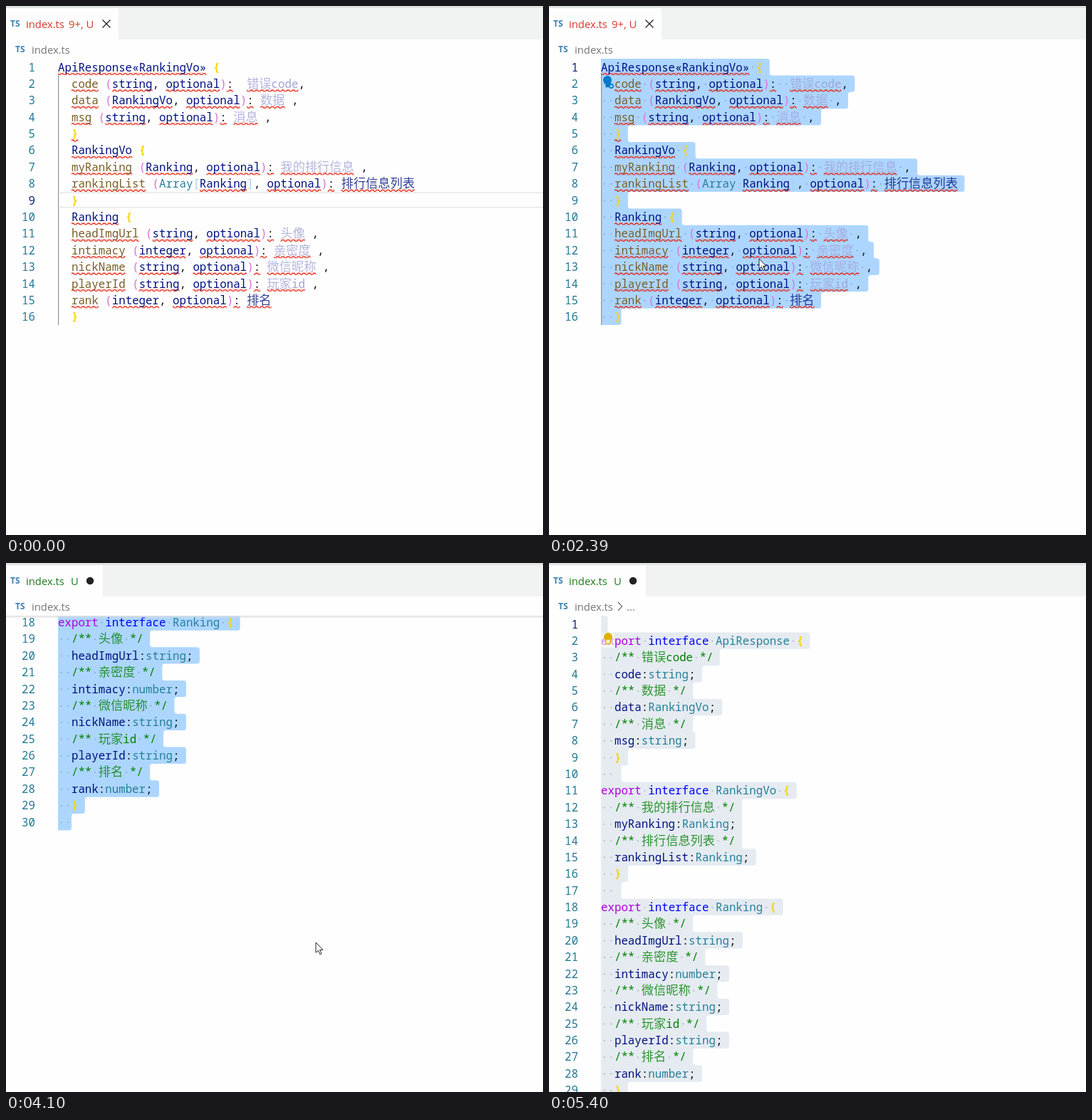
These frames come from a looping animation (754x743 px, 5490 ms). An HTML page:

```html
<!DOCTYPE html>
<html lang="zh">
<head>
<meta charset="utf-8">
<title>index.ts</title>
<style>
  html, body { margin: 0; width: 100%; height: 100%; overflow: hidden; background: #fefefe; }
  svg { display: block; width: 754px; height: 743px; }
  text { white-space: pre; }
  .code text { font: 15.78px "Noto Sans Mono", "DejaVu Sans Mono", monospace; }
  .code text.han { font: 300 17.2px "Noto Sans CJK SC", "Noto Sans CJK", sans-serif; fill-opacity: .8; }
  .code text.num { text-anchor: end; fill: #237893; }
  .code text.num.on { fill: #0b216f; }
  .ui { font: 14.8px "Open Sans", "Noto Sans", sans-serif; }
  .ts { font: bold 12px "Open Sans", "Noto Sans", sans-serif; fill: #3c7fb1; }
  .fn { fill: #795e26; } .var { fill: #001080; } .type { fill: #267f99; }
  .key { fill: #af00db; } .kw { fill: #0000ff; } .note { fill: #008000; }
  .code text.gold { fill: #fbd404; font-weight: 600; }
  .pink { fill: #da70d6; } .sky { fill: #9fd3f5; }
  .dim { fill: #a0a3d4; } .op { fill: #111; }
  .dots { fill: #333; fill-opacity: .25; }
</style>
</head>
<body>
<svg id="stage" viewBox="0 0 754 743">
  <defs>
    <pattern id="wave" patternUnits="userSpaceOnUse" x="73" y="19.6" width="7.38" height="3.69">
      <path transform="scale(1.23)" fill="#e51400"
        d="M5.5 0 2.5 3H1.1L4.1 0ZM4 0 6 2V.6L5.4 0ZM0 2 1 3H2.4L0 .6Z"/>
    </pattern>
    <linearGradient id="shade" x2="0" y2="1">
      <stop stop-color="#ddd"/><stop offset="1" stop-color="#ddd" stop-opacity="0"/>
    </linearGradient>
    <clipPath id="pane"><path d="M0 74H754V743H0Z"/></clipPath>
  </defs>

  <rect width="754" height="743" fill="#fefefe"/>
  <rect width="754" height="3" fill="#e2e3e3"/>
  <rect id="bar" y="3" width="754" height="44" fill="#f1f3f3"/>
  <text class="ts" x="6" y="29">TS</text>
  <g id="tab" class="ui">
    <text x="28" y="31">index.ts</text>
    <text id="badge" x="88" y="31"></text>
  </g>
  <path id="cross" d="M135.5 19.5 146.5 30.5M146.5 19.5 135.5 30.5" stroke="#222" stroke-width="1.3"/>
  <circle id="dirty" cy="25" r="5.2" fill="#222"/>
  <text class="ts" x="13" y="65">TS</text>
  <text class="ui" x="36" y="66.5" fill="#767676">index.ts</text>
  <g id="crumb">
    <path d="M97 55 102.5 61 97 67" fill="none" stroke="#767676" stroke-width="1.3"/>
    <text class="ui" x="109" y="66.5" fill="#767676">...</text>
  </g>

  <g clip-path="url(#pane)">
    <g id="raw" class="code"></g>
    <g id="made" class="code"></g>
    <rect id="shadow" y="74" width="754" height="4" fill="url(#shade)"/>
  </g>
  <path id="fold" d="M53.5 199.5 59.5 205.5 65.5 199.5" fill="none" stroke="#c3c7ca" stroke-width="1.3"/>

  <g id="pointer">
    <path id="beam" d="M-4-7.5H-1L0-6.5 1-7.5H4M0-6.5V6.5M-4 7.5H-1L0 6.5 1 7.5H4" fill="none" stroke="#222" stroke-width="1.2"/>
    <path id="arrow" d="M0 0V14.2L3.4 11.2 5.8 16.6 8 15.6 5.7 10.3H10Z" fill="#fff" stroke="#222" stroke-linejoin="round"/>
    <path id="hand" d="M-2-7.5C-2-9.5 1-9.5 1-7.5V-2.5C2-3.5 3.6-3 3.8-1.8 4.8-2.6 6-2 6.2-.8 7.4-1.2 8 0 7.6 1.5V5C7.6 7 6 8 6 10.5H-2C-2 8-6.5 4-6.5 1.5-5.6.2-4 .5-2 3Z"
      fill="#fff" stroke="#222" stroke-width="1.2" stroke-linejoin="round"/>
  </g>
</svg>

<script>
const LOOP = 5490, LEFT = 73, TOP = 74, ROW = 23.38, CELL = 9.47, HAN = 17.2;
const $ = id => document.getElementById(id);
const isHan = c => c >= '\u4e00' && c <= '\u9fff';
const span = s => [...s].reduce((w, c) => w + (isHan(c) ? HAN : CELL), 0);
const show = (el, on) => el.setAttribute('visibility', on ? 'inherit' : 'hidden');

function add(parent, tag, attrs, body) {
  const el = document.createElementNS('http://www.w3.org/2000/svg', tag);
  for (const key in attrs) el.setAttribute(key, attrs[key]);
  if (body) el.textContent = body;
  return parent.appendChild(el);
}

const rawRows = `ApiResponse«RankingVo» {
  code (string, optional):  错误code,
  data (RankingVo, optional): 数据 ,
  msg (string, optional): 消息 ,
  }
  RankingVo {
  myRanking (Ranking, optional): 我的排行信息 ,
  rankingList (Array[Ranking], optional): 排行信息列表
  }
  Ranking {
  headImgUrl (string, optional): 头像 ,
  intimacy (integer, optional): 亲密度 ,
  nickName (string, optional): 微信昵称 ,
  playerId (string, optional): 玩家id ,
  rank (integer, optional): 排名
  }`.split('\n');

const models = {
  ApiResponse: ['错误code|code:string', '数据|data:RankingVo', '消息|msg:string'],
  RankingVo: ['我的排行信息|myRanking:Ranking', '排行信息列表|rankingList:Ranking'],
  Ranking: ['头像|headImgUrl:string', '亲密度|intimacy:number', '微信昵称|nickName:string',
    '玩家id|playerId:string', '排名|rank:number']
};
const madeRows = [''];
for (const name in models) {
  madeRows.push(`export interface ${name} {`);
  for (const field of models[name]) {
    const [note, code] = field.split('|');
    madeRows.push(`  /** ${note} */`, `  ${code};`);
  }
  madeRows.push('  }', '  ');
}

const marks = { '{': 'gold', '}': 'gold', '(': 'pink', ')': 'pink', '[': 'sky', ']': 'sky' };

function rawClass(tok, rest) {
  if (isHan(tok[0])) return rest ? 'dim' : 'var';
  if (tok === 'Array') return 'type';
  if (/^\w/.test(tok)) return rest.startsWith(' (') ? 'fn' : 'var';
  return marks[tok] || (/[«»]/.test(tok) ? 'var' : 'op');
}

function madeClass(tok, rest) {
  if (tok.startsWith('/*')) return 'note';
  if (tok === 'export') return 'key';
  if (tok === 'interface') return 'kw';
  if (/^\w/.test(tok)) return rest[0] === ':' ? 'var' : 'type';
  return marks[tok] || 'op';
}

function buildDoc(id, rows, classOf, rawWaves) {
  const g = $(id);
  const sel = add(g, 'path', {});
  const guide = add(g, 'path', { fill: 'none', stroke: '#939393', 'stroke-width': 1.2 });
  const waves = add(g, 'g', {});
  const words = add(g, 'g', {});
  const clip = add(add(g, 'clipPath', { id: id + 'Clip' }), 'path', {});
  const dots = add(g, 'g', { class: 'dots', 'clip-path': `url(#${id}Clip)` });
  const nums = [];

  rows.forEach((row, i) => {
    const y = TOP + i * ROW, move = { transform: `translate(0 ${y})` };
    const line = add(words, 'g', move), wave = add(waves, 'g', move), dot = add(dots, 'g', move);
    const underline = (x, width) => add(wave, 'rect', { x, y: 19.6, width, height: 3.69, fill: 'url(#wave)' });
    nums.push(add(line, 'text', { class: 'num', x: 41, y: 17.6 }, String(i + 1)));

    for (const m of row.matchAll(/\/\*.*\*\/|[\u4e00-\u9fff]+\w*|\w+|\S/g)) {
      const tok = m[0], rest = row.slice(m.index + tok.length);
      const start = LEFT + span(row.slice(0, m.index));
      let x = start;
      for (const run of tok.match(/[\u4e00-\u9fff]+|[^\u4e00-\u9fff]+/g)) {
        add(line, 'text', { class: classOf(tok, rest) + (isHan(run[0]) ? ' han' : ''), x, y: 17.6 }, run);
        x += span(run);
      }
      const bad = /^[\w«»:\u4e00-\u9fff]/.test(tok) && tok !== 'Array' || (tok === '}' && i === 4);
      if (rawWaves && bad) underline(start, x - start);
    }
    if (!rawWaves && row !== '  }') underline(LEFT, Math.max(span(row), CELL));
    [...row].forEach((c, n) => {
      if (c === ' ') add(dot, 'circle', { cx: LEFT + span(row.slice(0, n)) + CELL / 2, cy: 12.3, r: 1.1 });
    });
  });
  const ends = rows.map(r => LEFT + span(r));
  return { g, sel, guide, waves, clip, nums, ends };
}

// Outline of the selection from (first, x) to the end of the text.
function selPath(ends, first, x) {
  const last = ends.length - 1, r = 3.5;
  const edge = i => ends[i] + (i < last ? CELL : 0);
  const y = i => TOP + i * ROW;
  let d = `M${x} ${y(first)}H${edge(first) - r}q${r} 0 ${r} ${r}`;
  for (let i = first + 1; i <= last; i++) {
    const gap = edge(i) - edge(i - 1);
    if (Math.abs(gap) < 1) continue;
    const c = Math.min(r, Math.abs(gap) / 2), s = Math.sign(gap) * c;
    d += `V${y(i) - c}q0 ${c} ${s} ${c}H${edge(i) - s}q${s} 0 ${s} ${c}`;
  }
  return d + `V${y(last + 1) - r}q0 ${r} ${-r} ${r}H${LEFT}V${y(first + 1)}H${x}Z`;
}

function select(doc, first, x, fill) {
  const d = first < 0 ? '' : selPath(doc.ends, first, x);
  doc.sel.setAttribute('d', d);
  doc.clip.setAttribute('d', d);
  doc.sel.setAttribute('fill', fill);
}

function addBulb(g, color, badge) {
  const b = add(g, 'g', {});
  if (!badge) add(b, 'rect', { x: 73, y: 98, width: 18.5, height: 21, fill: '#fff', 'fill-opacity': .55 });
  add(b, 'circle', { cx: badge ? 82 : 83, cy: 104, r: 6, fill: color });
  add(b, 'path', { d: 'M80 107H86V113.5H80Z', fill: badge ? color : '#fff3c4', stroke: color, 'stroke-width': 1.3 });
  if (badge) add(b, 'circle', { cx: 87.5, cy: 112.5, r: 2.6, fill: '#add6ff', stroke: color, 'stroke-width': 1.6 });
  return b;
}

const raw = buildDoc('raw', rawRows, rawClass, true);
const made = buildDoc('made', madeRows, madeClass, false);
raw.guide.setAttribute('d', `M73.6 ${TOP + ROW}V${TOP + 16 * ROW}`);
const active = add(raw.g, 'path', { fill: 'none', stroke: '#ececec', 'stroke-width': 2 });
const fixBulb = addBulb(raw.g, '#007acc', true);
addBulb(made.g, '#ddb100', false);
const carets = [raw, made].map(doc => add(doc.g, 'rect', { width: 2.4, height: ROW, fill: '#000' }));

// Pointer stops: tick, x, y.
const stops = [
  [1, 641, 728], [4, 420, 596], [8, 217, 498.5], [9, 207, 475], [13, 12, 130], [14, 10, 100],
  [15, 62, 92], [16, 70, 98], [18, 287, 345], [19, 287, 345], [20, 295, 355], [41, 295, 355],
  [42, 320, 380], [45, 560, 620], [46, 580, 642], [49, 551, 600], [50, 437, 532], [51, 435, 533],
  [60, 435, 533], [64, 723, 670], [67, 650, 719]
];
// Scroll stops: tick, offset.
const scrolls = [[50, 0], [51, 90], [52, 233], [53, 400], [54, 467], [56, 467], [57, 233], [58, 70], [59, 0]];

function at(list, k, col) {
  if (k <= list[0][0]) return list[0][col];
  const i = list.findIndex(p => p[0] >= k);
  if (i < 0) return list[list.length - 1][col];
  const a = list[i - 1], b = list[i];
  return a[col] + (b[col] - a[col]) * (k - a[0]) / (b[0] - a[0]);
}

function caretOn(k) {
  if (k < 32) return k >= 9 && k < 20 || k >= 25 && k < 31;
  return k < 70 && Math.floor((k - 32) / 6.5) % 2 === 0;
}

function draw(k) {
  const done = k >= 32, clean = k >= 37;
  const x = at(stops, k, 1), y = at(stops, k, 2);

  $('bar').setAttribute('x', clean ? 136 : 158);
  $('tab').setAttribute('fill', clean ? '#1c7a1c' : '#d5382a');
  $('badge').textContent = clean ? 'U' : '9+, U';
  $('badge').setAttribute('x', clean ? 91 : 88);
  $('dirty').setAttribute('cx', clean ? 118 : 141);
  show($('cross'), !done);
  show($('dirty'), done);
  show($('crumb'), k >= 63);
  show(raw.g, !done);
  show(made.g, done);
  show($('fold'), k >= 12 && k <= 16);

  let row = 8, cx = LEFT;
  if (k >= 9) {
    row = k >= 15 ? 0 : Math.max(0, Math.min(15, Math.floor((y - TOP) / ROW)));
    cx = LEFT + Math.max(0, Math.round((x - LEFT) / CELL)) * CELL;
    cx = k >= 15 ? LEFT : Math.min(cx, raw.ends[row]);
  }
  select(raw, k > 9 ? row : -1, cx, '#add6ff');
  const mid = TOP + row * ROW;
  active.setAttribute('d', k <= 9 ? `M75 ${mid + 1.2}H754M75 ${mid + ROW - 1.6}H754` : '');
  raw.nums.forEach((n, i) => n.classList.toggle('on', i === row));
  show(fixBulb, k >= 18 && !done);

  select(made, 0, LEFT, k >= 70 ? '#e5ebf1' : '#add6ff');
  made.nums[0].classList.add('on');
  show(made.waves, !clean);
  const scroll = at(scrolls, k, 1);
  made.g.setAttribute('transform', `translate(0 ${-scroll})`);
  show($('shadow'), scroll > 0);

  carets.forEach((c, i) => {
    c.setAttribute('x', (i ? LEFT : cx) - .2);
    c.setAttribute('y', i ? TOP : mid);
    show(c, caretOn(k));
  });

  show($('pointer'), k >= 1 && k < 68);
  $('pointer').setAttribute('transform', `translate(${x} ${y})`);
  show($('beam'), k < 16);
  show($('hand'), k === 16);
  show($('arrow'), k > 16);
}

let shown = -1;
function tick() {
  const t = performance.now() % LOOP;
  const k = Math.min(70, Math.floor((t + 22) / 77.45));
  if (k !== shown) draw(shown = k);
  requestAnimationFrame(tick);
}
tick();
</script>
</body>
</html>
```
